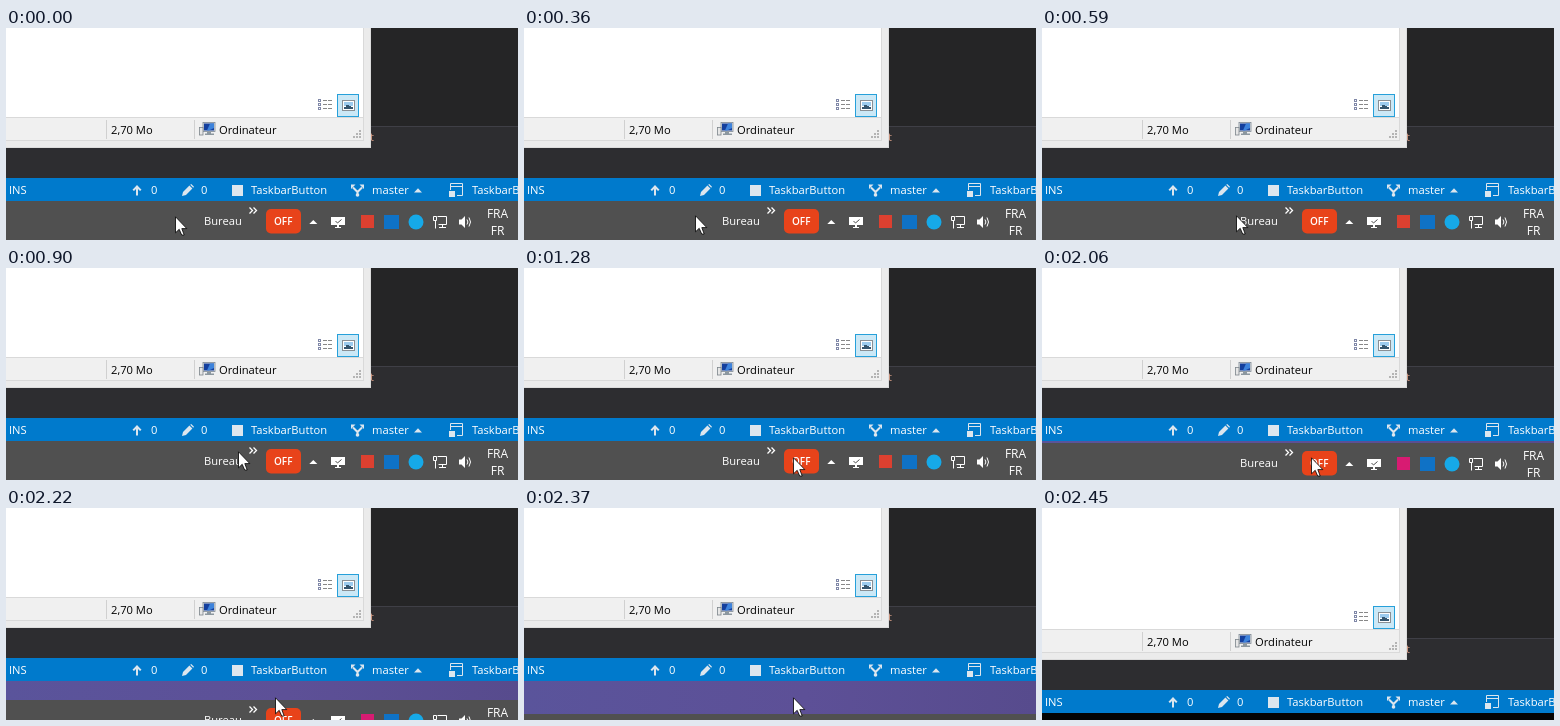
Write an HTML page that moves like this. It is 512x212 px and loops after 3.06 s.

```html
<!DOCTYPE html>
<html lang="fr">
<head>
<meta charset="utf-8">
<title>Taskbar auto-hide</title>
<style>
  html, body { margin: 0; width: 100%; height: 100%; overflow: hidden; background: #000; }
  svg { display: block; width: 100vw; height: 100vh; }
  text { font: 500 11.2px "Open Sans", "Noto Sans", sans-serif; white-space: pre; }
  .px { shape-rendering: crispEdges; }
</style>
</head>
<body>
<svg viewBox="0 0 512 212" preserveAspectRatio="xMidYMid meet">
  <defs>
    <linearGradient id="wall">
      <stop offset="0" stop-color="#5a549b"/>
      <stop offset=".55" stop-color="#5d5097"/>
      <stop offset="1" stop-color="#574b8d"/>
    </linearGradient>
  </defs>
  <rect width="512" height="212" fill="#030303"/>
  <rect id="desk" y="173" width="512" height="39" fill="url(#wall)"/>

  <g id="shell">
    <!-- editor -->
    <g class="px">
      <rect y="-40" width="512" height="138" fill="#252526"/>
      <rect y="98" width="512" height="52" fill="#2d2d30"/>
      <rect y="98" width="512" height="1" fill="#3f3f46"/>
      <rect y="150" width="512" height="23" fill="#007acc"/>
    </g>
    <text x="364" y="113" fill="#d69d85">t</text>

    <!-- explorer window -->
    <g class="px">
      <rect y="-40" width="365" height="160" fill="#ebebeb"/>
      <rect y="-40" width="357" height="129" fill="#fff"/>
      <rect y="89" width="358" height="24" fill="#f0f0f0"/>
      <path d="M0 89.5H357M0 112.5H357.5V-40" fill="none" stroke="#d9d9d9"/>
      <path d="M0 119.5H364.5V-40" fill="none" stroke="#dcdcdc"/>
      <path d="M100.5 92V111M188.5 92V111" stroke="#d0d0d0"/>
      <rect x="331.5" y="66.5" width="21" height="22" fill="#cbe8f6" stroke="#26a0da"/>
      <rect x="336.5" y="72.5" width="12" height="10" fill="#fff" stroke="#8a8f94"/>
      <rect x="338" y="74" width="9" height="4" fill="#9ccbee"/>
      <path d="M338 81V79H340V77H343V78H345V79H347V81Z" fill="#35566f"/>
      <g id="list"></g>
      <g id="grip" fill="#b4b4b4"></g>
    </g>
    <text x="105" y="106">2,70 Mo</text>
    <g>
      <rect x="197" y="94.5" width="12" height="9" fill="#d9dee3" stroke="#7f8a94" stroke-width=".8"/>
      <rect x="198" y="95.5" width="10" height="7" fill="#143f9e"/>
      <path d="M204 95.5H208V100L203 102.5H201Z" fill="#3d83dc"/>
      <path d="M201 104H205V105.5H208V107H199V105.5H201Z" fill="#8c979f"/>
      <rect x="193.5" y="99.5" width="3.5" height="7.5" fill="#e6e6e6" stroke="#7d868c" stroke-width=".8"/>
    </g>
    <text x="213" y="106">Ordinateur</text>

    <!-- status bar -->
    <g fill="#dce6ee">
      <path d="M131 157L135.5 161.8L134 163L132 161V167.5H130V161L128 163L126.5 161.8Z"/>
      <path d="M176 168L177 164L183.4 157.6L186.4 160.6L180 167ZM184.2 156.8L185.2 156L188 158.8L187.2 159.8Z"/>
      <rect x="226" y="157" width="11" height="11"/>
      <path d="M351.5 168V164L347 159.5M351.5 164L356 159.5" fill="none" stroke="#dce6ee" stroke-width="2"/>
      <path d="M345 156.5H349.5L345 161ZM358 156.5H353.5L358 161Z"/>
      <circle cx="351.5" cy="167" r="1.8"/>
      <path d="M408 164.5H416L412 160.3Z"/>
      <path d="M444.5 162V155.5H456.5V167.5H451M445 158.5H456" fill="none" stroke="#dce6ee"/>
      <rect x="443" y="163" width="6" height="6"/>
    </g>
    <g fill="#fff">
      <text x="3" y="166">INS</text>
      <text x="145" y="166">0</text>
      <text x="195" y="166">0</text>
      <text x="245" y="166">TaskbarButton</text>
      <text x="366" y="166">master</text>
      <text x="466" y="166">TaskbarButton</text>
    </g>
  </g>

  <g id="bar">
    <rect class="px" y="173" width="512" height="43" fill="#505050"/>
    <g fill="#fff">
      <text x="198" y="197">Bureau</text>
      <path d="M243.5 179.5L246.5 182.5L243.5 185.5M247.5 179.5L250.5 182.5L247.5 185.5" fill="none" stroke="#fff" stroke-width="1.3"/>
      <rect x="260" y="181" width="35" height="24.5" rx="5" fill="#e8431a"/>
      <text x="268" y="197" style="font-size:10px;font-weight:600">OFF</text>
      <path d="M303.3 196H311.3L307.3 192Z"/>
      <path d="M325 189H339V197H333V199H335V200H329V199H331V197H325Z"/>
      <path d="M329.5 193L331.5 195L335.5 191.5" fill="none" stroke="#505050"/>
      <rect id="app" x="355" y="187" width="13" height="13"/>
      <rect x="378" y="187" width="15" height="14" fill="#0f72c6"/>
      <circle cx="410" cy="194" r="7.5" fill="#16a9e8"/>
      <path d="M431.5 188.5H440.5V196.5H432.5M436.5 197V199.5M433 199.5H440M427.5 188.5H430.5V192.5H427.5ZM429.5 193V200.5" fill="none" stroke="#fff"/>
      <path d="M453 191.5H455.5L459 188V200L455.5 196.5H453Z"/>
      <path d="M461 191.5Q462.8 194 461 196.5M463 189.5Q466 194 463 198.5" fill="none" stroke="#fff"/>
      <text x="491.5" y="190" text-anchor="middle" style="font-size:12px">FRA</text>
      <text x="491.5" y="207" text-anchor="middle" style="font-size:12px">FR</text>
    </g>
  </g>

  <g id="mouse">
    <g id="press" fill="none">
      <circle r="11.5" stroke="#000"/>
      <circle r="10.5" stroke="#fff"/>
    </g>
    <path d="M.5 .8V16.8L4.2 13.3L6.7 19H9.2L6.8 12.6H11.8Z" fill="#fff" stroke="#000" stroke-width=".8"/>
  </g>
</svg>
<script>
  const LOOP = 3060;
  const $ = id => document.getElementById(id);

  // [ms, x, y]: the pointer holds each place until the next one
  const path = [
    [0, 169, 188], [360, 171, 187], [430, 176, 187], [510, 184, 187],
    [590, 194, 187], [670, 208, 188], [740, 220, 189], [820, 229, 189],
    [900, 232, 183], [980, 239, 177], [1050, 249, 175], [1130, 259, 181],
    [1200, 266, 192], [1280, 269, 189]
  ];
  // [ms, px]: how far the taskbar has slid down
  const slide = [[0, 0], [2060, 2], [2140, 9], [2220, 19], [2300, 28], [2370, 33]];
  const PRESS = 1830, RELEASE = 2060, HIDDEN = 2450;

  const at = (keys, t) => keys.findLast(k => k[0] <= t);
  const move = (el, x, y) => el.setAttribute('transform', `translate(${x} ${y})`);
  const show = (el, on) => el.setAttribute('visibility', on ? 'inherit' : 'hidden');
  const box = (x, y, w, h, fill) =>
    `<rect x="${x}" y="${y}" width="${w}" height="${h}"${fill ? ` fill="${fill}"` : ''}/>`;

  let rows = '', dots = '';
  for (let i = 0; i < 3; i++) {
    const y = 71 + i * 4;
    rows += box(312, y, 3, 3, '#8088a8') + box(313, y + 1, 1, 1, '#fff');
    for (const x of [317, 322]) rows += box(x, y + 1, 4, 1, '#888');
    for (let j = 0; j <= i; j++) dots += box(353 - j * 3, 102 + i * 3, 2, 2);
  }
  $('list').innerHTML = rows;
  $('grip').innerHTML = dots;

  function draw(t) {
    const hidden = t >= HIDDEN;
    const [, x, y] = at(path, t);
    move($('mouse'), x, y);
    show($('mouse'), !hidden);
    show($('press'), t >= PRESS && t < RELEASE);
    move($('bar'), 0, at(slide, t)[1]);
    show($('bar'), !hidden);
    show($('desk'), !hidden);
    move($('shell'), 0, hidden ? 32 : 0);
    $('app').setAttribute('fill', t < RELEASE ? '#dc4030' : '#d81b72');
  }

  const start = performance.now();
  function tick() {
    draw((performance.now() - start) % LOOP);
    requestAnimationFrame(tick);
  }
  tick();
</script>
</body>
</html>
```
